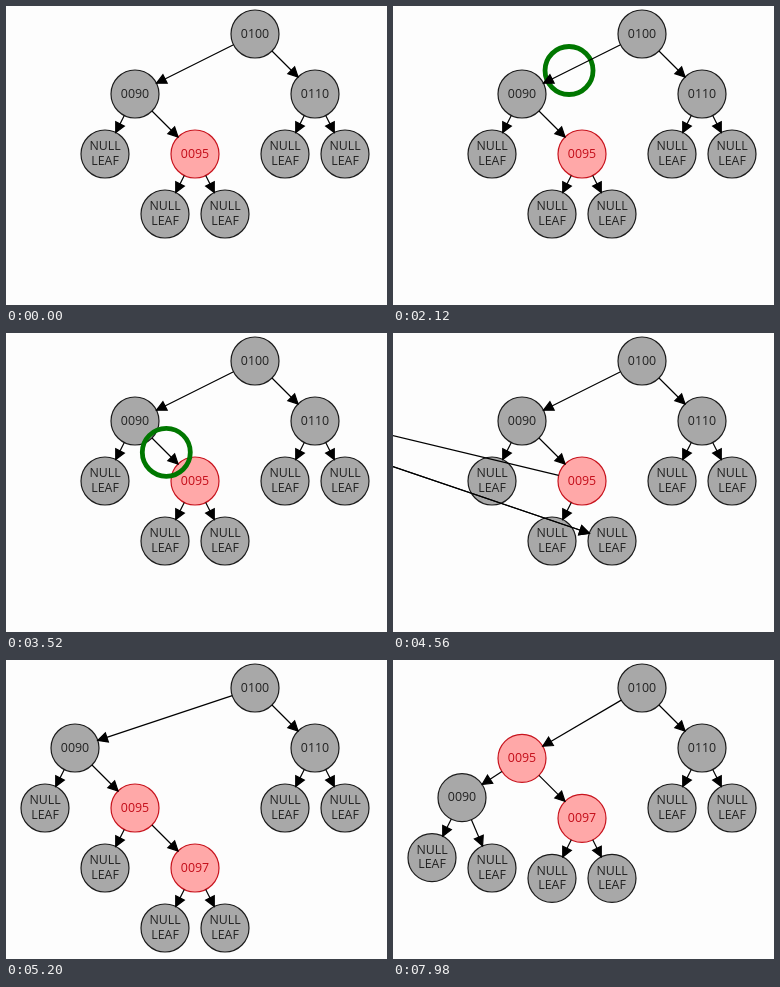
These frames come from a looping animation (381 px wide and 299 px high, 8 s). An HTML page with a canvas:

```html
<!DOCTYPE html>
<html lang="en">
<head>
<meta charset="utf-8">
<title>Red-black tree insertion</title>
<style>
html, body { margin: 0; width: 100%; height: 100%; overflow: hidden; background: #fdfdfd; }
canvas { display: block; }
</style>
</head>
<body>
<canvas id="stage" width="381" height="299"></canvas>
<script>
const ctx = document.getElementById('stage').getContext('2d');
const LOOP = 8000, R = 24, SCALE = 1.2, MOVE = 648;
const INSERT = 4560, ROTATE = 7444;
const BLACK = { line: '#1c1c1c', text: '#222', fill: '#a8a8a8' };
const RED = { line: '#c8141e', text: '#c40c18', fill: '#ffa8a8' };

// Each path: position before the insertion, after it, after the rotation.
const node = (label, look, ...path) => ({ label, look, path });
const leaf = (...path) => node('NULL LEAF', BLACK, ...path);
const nodes = {
  n100: node('0100', BLACK, [249, 28]),
  n90: node('0090', BLACK, [129, 88], [69, 88], [69, 148]),
  n110: node('0110', BLACK, [309, 88]),
  leaf110L: leaf([279, 148]),
  leaf110R: leaf([339, 148]),
  leaf90: leaf([99, 148], [39, 148], [39, 208]),
  n95: node('0095', RED, [189, 148], [129, 148], [129, 88]),
  leaf95: leaf([159, 208], [99, 208]),
  n97: node('0097', RED, [-311, 28], [189, 208], [189, 148]),
  leaf97L: leaf([219, 208], [159, 268], [159, 208]),
  leaf97R: leaf([219, 208], [219, 268], [219, 208])
};

const fixedEdges = ['n100 n110', 'n110 leaf110L', 'n110 leaf110R', 'n90 leaf90'];
const grown = ['n95 n97', 'n97 leaf97L', 'n97 leaf97R'];
const edgesAt = t => fixedEdges.concat(
  t < ROTATE ? ['n100 n90', 'n90 n95', 'n95 leaf95']
             : ['n100 n95', 'n95 n90', 'n90 leaf95'],
  t < INSERT ? ['n95 leaf97R'] : grown);

const pulses = [[1040, 1726, 'n100'], [2430, 3182, 'n90'], [3880, INSERT, 'n95']];
const walks = [[1726, 2430, 'n100', 'n90'], [3182, 3880, 'n90', 'n95']];

const progress = (t, start, length) => Math.min(1, Math.max(0, (t - start) / length));
const mix = (a, b, k) => [a[0] + (b[0] - a[0]) * k, a[1] + (b[1] - a[1]) * k];
const active = (list, t) => list.find(([from, to]) => t >= from && t < to);

// Triangle wave, 1 at its peak and 0 half a period later.
function pulse(t) {
  const phase = ((t - 2500) / 1680 % 1 + 1) % 1;
  return Math.abs(1 - 2 * phase);
}

function place(name, t) {
  const [a, b = a, c = b] = nodes[name].path;
  const p = mix(a, b, progress(t, INSERT, 640));
  return mix(p, c, progress(t, ROTATE, MOVE));
}

function disc([x, y], r) {
  ctx.beginPath();
  ctx.arc(x, y, r, 0, 2 * Math.PI);
}

function drawNode({ label, look }, [x, y]) {
  ctx.lineWidth = SCALE;
  ctx.fillStyle = look.fill;
  ctx.strokeStyle = look.line;
  disc([x, y], R);
  ctx.fill();
  ctx.stroke();
  ctx.fillStyle = look.text;
  const lines = label.split(' ');
  lines.forEach((text, i) => {
    ctx.fillText(text, x, y + 3.6 + (i - (lines.length - 1) / 2) * 14.4);
  });
}

function drawArrow(a, b, width, color) {
  const d = Math.hypot(b[0] - a[0], b[1] - a[1]) || 1;
  const ux = (a[0] - b[0]) / d, uy = (a[1] - b[1]) / d;
  const x = b[0] + ux * R, y = b[1] + uy * R;
  const h = 8 * SCALE, w = 4 * SCALE;
  ctx.lineWidth = width;
  ctx.strokeStyle = ctx.fillStyle = color;
  ctx.beginPath();
  ctx.moveTo(a[0] - ux * R, a[1] - uy * R);
  ctx.lineTo(x, y);
  ctx.stroke();
  ctx.beginPath();
  ctx.moveTo(x, y);
  ctx.lineTo(x + ux * h - uy * w, y + uy * h + ux * w);
  ctx.lineTo(x + ux * h + uy * w, y + uy * h - ux * w);
  ctx.closePath();
  ctx.stroke();
  ctx.fill();
}

function draw(t) {
  ctx.fillStyle = '#fdfdfd';
  ctx.fillRect(0, 0, 381, 299);
  ctx.font = '12.4px "Open Sans", "Noto Sans", sans-serif';
  ctx.textAlign = 'center';

  const lit = active(pulses, t);
  for (const name in nodes) {
    if (name === 'leaf97L' && t <= INSERT) continue;
    const p = place(name, t);
    if (lit && lit[2] === name) {
      ctx.fillStyle = '#f00';
      disc(p, R + SCALE * (3 + 4 * pulse(t)));
      ctx.fill();
    }
    drawNode(nodes[name], p);
  }

  const walk = active(walks, t);
  if (walk) {
    const [start, , from, to] = walk;
    ctx.lineWidth = 4 * SCALE;
    ctx.strokeStyle = '#070';
    disc(mix(place(from, t), place(to, t), progress(t, start, MOVE)), R);
    ctx.stroke();
  }

  for (const edge of edgesAt(t)) {
    const [a, b] = edge.split(' ').map(name => place(name, t));
    if (edge === 'n90 n95' && t >= 6740) {
      drawArrow(a, b, SCALE * (3 + 2 * pulse(t)), '#f00');
    }
    drawArrow(a, b, SCALE, '#000');
  }
}

// The picture advances in 40 ms ticks; the tick grid shifts by 20 ms in the long rest.
function tick(t) {
  const shift = t < 5220 ? 0 : 20;
  return Math.floor((t - shift) / 40) * 40 + shift;
}

const began = performance.now();
function run() {
  draw(tick((performance.now() - began) % LOOP));
  requestAnimationFrame(run);
}
run();
</script>
</body>
</html>
```
